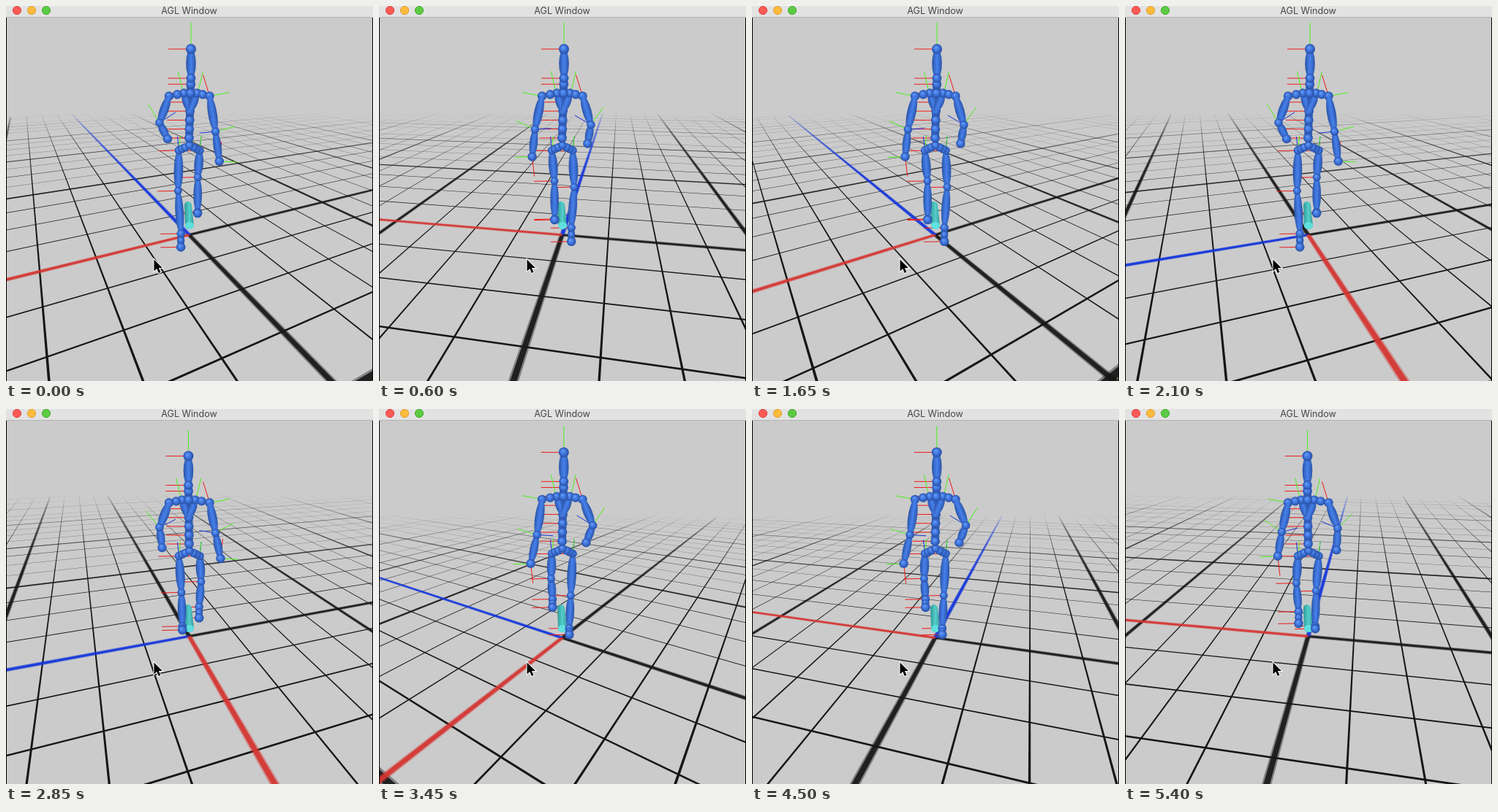
Recreate the animation shown at these times as an HTML page with a canvas. Size 502 by 514 pixels, loop 5500 ms.

```html
<!DOCTYPE html>
<html lang="en">
<head>
<meta charset="utf-8">
<title>Walking figure</title>
<style>
html, body { margin: 0; width: 100%; height: 100%; overflow: hidden; background: #cbcbcb; }
canvas { display: block; width: 502px; height: 514px; }
</style>
</head>
<body>
<canvas id="stage" width="502" height="514"></canvas>
<script>
const ctx = document.getElementById('stage').getContext('2d');
const STEP = 150, LOOP = 5500, STRIDE = 7;
const FOCAL = 430, CX = 250.5, CY = 265;
const RED = '#f01818', GREEN = '#4cf01c', BLUE = '#1430d8';

// Heading of the red axis in degrees at a few steps.
const turn = [[0, 206], [8, 135], [14, 288.3], [19, 288.1], [23, 237], [30, 164.5], [36, 171]];

function mix(a, b, f) {
  return Array.isArray(a) ? a.map((v, i) => mix(v, b[i], f)) : a + (b - a) * f;
}

function sample(track, t) {
  const i = Math.max(1, track.findIndex(([at]) => at >= t));
  const [t0, a] = track[i - 1], [t1, b] = track[i];
  return mix(a, b, (t - t0) / (t1 - t0));
}

// Cosine of one stride that peaks at the given step.
const swing = (t, peak, harmonic = 1) => Math.cos(harmonic * (t - peak) * 2 * Math.PI / STRIDE);

// Joints of the left side; the right side is its mirror half a stride later.
function limbs(t, bob) {
  const toe = [239.3 + 2 * swing(t, 5.2), 299.5 + 27 * swing(t, 6.4) + 9 * swing(t, 0.3, 2)];
  return {
    shoulder: [223, 123.5 + 5 * bob],
    elbow: [212.5 - 4 * swing(t, 6), 166 - 8 * swing(t, 6.2)],
    hand: [213.5 + 7 * swing(t, 6.3) + 3 * swing(t, 6.5, 2), 197.5 - 19 * swing(t, 6.3)],
    hip: [236.5, 198 + 3.5 * bob],
    knee: [237.3 - 3 * swing(t, 1), 244 + 13.5 * swing(t, 6.1)],
    ankle: [toe[0], toe[1] - 10 - 9 * swing(t, 0.4)],
    toe, side: -1
  };
}

function mirror(limb) {
  const out = { side: -limb.side };
  for (const name in limb)
    if (name !== 'side') out[name] = [501.5 - limb[name][0], limb[name][1]];
  return out;
}

function drawGrid(pitchDeg, yawDeg) {
  const pitch = pitchDeg * Math.PI / 180, yaw = yawDeg * Math.PI / 180;
  const c = Math.cos(pitch), s = Math.sin(pitch);
  const height = 0.85 + 6.54 * s, dist = 6.54 * c;
  const depth = p => (dist + p[1]) * c + height * s;
  const rowAt = z => CY - FOCAL * s / c + FOCAL * height / (z * c);
  const place = (u, v) => [u * Math.cos(yaw) + v * Math.sin(yaw), u * Math.sin(yaw) - v * Math.cos(yaw)];
  const project = p => [CX + FOCAL * p[0] / depth(p), rowAt(depth(p))];

  // Depth depends on the screen row alone, so a vertical gradient gives the fog.
  function fog(rgb, strength = 1) {
    const far = 24, near = 10, top = rowAt(far), bottom = rowAt(near);
    const g = ctx.createLinearGradient(0, top, 0, bottom);
    for (let z = far; z >= near; z -= 2)
      g.addColorStop((rowAt(z) - top) / (bottom - top), `rgba(${rgb},${strength * (far - z) / (far - near)})`);
    return g;
  }

  function ribbon(a, b, width, fill) {
    const near = 0.8, za = depth(a), zb = depth(b);
    if (za < near && zb < near) return;
    if (za < near) a = mix(a, b, (near - za) / (zb - za));
    else if (zb < near) b = mix(b, a, (near - zb) / (za - zb));
    const len = Math.hypot(b[0] - a[0], b[1] - a[1]);
    const nx = (a[1] - b[1]) / len * width / 2, ny = (b[0] - a[0]) / len * width / 2;
    ctx.beginPath();
    for (const [p, k] of [[a, 1], [b, 1], [b, -1], [a, -1]])
      ctx.lineTo(...project([p[0] + nx * k, p[1] + ny * k]));
    ctx.fillStyle = fill;
    ctx.fill();
  }

  function softLine(a, b, rgb) {
    ribbon(a, b, 0.125, fog(rgb, 0.4));
    ribbon(a, b, 0.08, fog(rgb, 0.9));
  }

  const N = 20, ink = '22,22,22', thin = fog(ink);
  for (let i = -N; i <= N; i++) {
    if (!i) continue;
    for (const [a, b] of [[place(i, -N), place(i, N)], [place(-N, i), place(N, i)]]) {
      if (i % 4) ribbon(a, b, 0.029, thin);
      else softLine(a, b, ink);
    }
  }
  const origin = place(0, 0);
  softLine(origin, place(-N, 0), ink);
  softLine(origin, place(0, -N), ink);
  softLine(origin, place(0, N), '18,52,218');
  softLine(origin, place(N, 0), '212,52,48');
}

function ray([x, y], dx, dy, color) {
  ctx.strokeStyle = color;
  ctx.lineWidth = 1;
  ctx.beginPath();
  ctx.moveTo(x, y);
  ctx.lineTo(x + dx, y + dy);
  ctx.stroke();
}

function ball([x, y], r = 6) {
  const g = ctx.createRadialGradient(x - r * 0.25, y - r * 0.35, 0, x, y, r);
  g.addColorStop(0, '#6c9ef6');
  g.addColorStop(0.45, '#447ce4');
  g.addColorStop(1, '#274e a4'.replace(' ', ''));
  ctx.fillStyle = g;
  ctx.beginPath();
  ctx.arc(x, y, r, 0, 7);
  ctx.fill();
}

function bone(a, b, half) {
  const len = Math.hypot(b[0] - a[0], b[1] - a[1]);
  const g = ctx.createLinearGradient(0, -half, 0, half);
  ['#2b54a6', '#4680ec', '#2b54a6'].forEach((tone, i) => g.addColorStop(i / 2, tone));
  ctx.save();
  ctx.translate((a[0] + b[0]) / 2, (a[1] + b[1]) / 2);
  ctx.rotate(Math.atan2(b[1] - a[1], b[0] - a[0]));
  ctx.fillStyle = g;
  ctx.beginPath();
  ctx.ellipse(0, 0, len / 2 + 1, half, 0, 0, 7);
  ctx.fill();
  ctx.restore();
}

function drawMarker() {
  const g = ctx.createLinearGradient(244, 0, 258, 0);
  ['#2f9a98', '#55cfcc', '#2f8f8e'].forEach((tone, i) => g.addColorStop(i / 2, tone));
  ctx.fillStyle = g;
  ctx.beginPath();
  ctx.ellipse(249, 273, 5, 5, 0, Math.PI, 0);
  ctx.lineTo(257, 301);
  ctx.ellipse(251, 301, 6, 5, 0, 0, Math.PI);
  ctx.fill();
  ctx.fillStyle = '#5fe0de';
  ctx.beginPath();
  ctx.ellipse(251, 301, 6, 5, 0, 0, 7);
  ctx.fill();
}

function drawAxes(head, spine, sides) {
  const chest = spine[2];
  ray(head, 0, -36, GREEN);
  for (const p of [head, ...spine]) ray(p, -31, 0, RED);
  for (const { shoulder, elbow, hand, hip, knee, ankle, toe, side } of sides) {
    ray([chest[0] + side * 10, chest[1]], side * 7, -30, GREEN);
    for (const p of [hip, knee, ankle, toe]) ray(p, -28, 0.5, RED);
    ray(hip, side * 2, -19, BLUE);
    ray(hip, 2, -20, GREEN);

    // A short forearm on screen means a bent elbow, which tips its axes up.
    const fore = Math.hypot(hand[0] - elbow[0], hand[1] - elbow[1]);
    const bend = Math.max(0, Math.min(1, (44 - fore) / 20));
    ray(elbow, side * 27 * Math.cos(bend), -27 * Math.sin(bend) - 3, GREEN);
    ray(elbow, -side * 22, 5 - 20 * bend, BLUE);
    if (bend < 0.7) {
      ray(shoulder, side * 27, -5, GREEN);
      ray(hand, side * 24, 1, GREEN);
      ray(hand, 3, side * -27, RED);
    }
    if (side > 0) ray(shoulder, -9, -29, RED);
  }
}

function drawFigure(t, bob) {
  const left = limbs(t, bob), right = mirror(limbs(t + STRIDE / 2, bob));
  const sides = [left, right];
  const head = [253 - 3.5 * bob, 59 + 5.5 * bob];
  const neck = [head[0], head[1] + 40], base = [250.5, 181 + 4 * bob];
  const spine = [neck];
  for (let i = 0; i < 7; i++) spine.push(mix(neck, base, 0.1 + 0.15 * i));

  drawAxes(head, spine, sides);
  drawMarker();

  // The leg whose foot is higher on screen is farther away.
  const legs = [...sides].sort((a, b) => a.toe[1] - b.toe[1]);
  for (const { hip, knee, ankle, toe } of legs) {
    bone(hip, knee, 6.3);
    bone(knee, ankle, 5.8);
    bone(ankle, toe, 5);
    ball(knee, 5.5);
    ball(ankle, 5.8);
    ball(mix(ankle, toe, 0.5), 5);
    ball(toe, 6.3);
    for (const f of [1, 0.7, 0.4, 0]) ball(mix([251, hip[1] - 7], hip, f), 5.8);
  }

  for (let i = spine.length - 1; i > 0; i--) {
    bone(spine[i], spine[i - 1], 5.5);
    ball(spine[i], 6.4);
  }
  for (const { shoulder, elbow, hand, side } of sides) {
    const collar = [spine[2][0] + side * 9, spine[2][1]];
    bone(collar, spine[4], 6);
    for (const f of [0, 0.45, 1]) ball(mix(collar, shoulder, f), 6.2);
    bone(shoulder, elbow, 6.2);
    bone(elbow, hand, 5.6);
    ball(elbow, 5.8);
    ball(hand, 6.2);
  }
  ball(spine[2], 6.4);
  bone(head, neck, 6.8);
  ball(neck, 6.4);
  ball(head, 7);
}

function drawWindow() {
  ctx.fillStyle = '#e3e2e3';
  ctx.fillRect(0, 0, 502, 16);
  ctx.fillStyle = '#b4b4b4';
  ctx.fillRect(0, 15, 502, 1);
  [['#fc5a55', '#dc4440'], ['#fdbb3d', '#dc9f30'], ['#5bcb43', '#46a834']].forEach(([fill, rim], i) => {
    ctx.fillStyle = fill;
    ctx.strokeStyle = rim;
    ctx.lineWidth = 1;
    ctx.beginPath();
    ctx.arc(15 + 20 * i, 6, 5.6, 0, 7);
    ctx.fill();
    ctx.stroke();
  });
  ctx.fillStyle = '#464646';
  ctx.font = '12.6px Inter, "Open Sans", sans-serif';
  ctx.textAlign = 'center';
  ctx.fillText('AGL Window', 250.5, 11);

  ctx.fillStyle = '#000';
  ctx.fillRect(0, 16, 1, 498);
  ctx.fillRect(501, 16, 1, 498);
}

function drawCursor() {
  const arrow = new Path2D('M202.5 347.5v16l3.7-3.4 2.6 5.8 2.7-1.2-2.6-5.6h5.1z');
  ctx.lineWidth = 2;
  ctx.strokeStyle = '#fff';
  ctx.stroke(arrow);
  ctx.fillStyle = '#000';
  ctx.fill(arrow);
}

function draw(now) {
  const k = Math.floor(now % LOOP / STEP);
  // The stride runs slightly ahead near the end of the loop.
  const t = k + Math.max(0, k - 30) * 0.05;
  // The body sinks in a short pulse twice per stride, and the camera tips with it.
  const bob = Math.min(1, 1.155 * Math.max(0, swing(t, 1.35, 2)) ** 3);
  ctx.fillStyle = '#cbcbcb';
  ctx.fillRect(0, 0, 502, 514);
  drawGrid(23.5 + 4.5 * bob, sample(turn, k));
  drawFigure(t, bob);
  drawWindow();
  drawCursor();
}

const start = performance.now();
function tick() {
  draw(performance.now() - start);
  requestAnimationFrame(tick);
}
tick();
</script>
</body>
</html>
```
